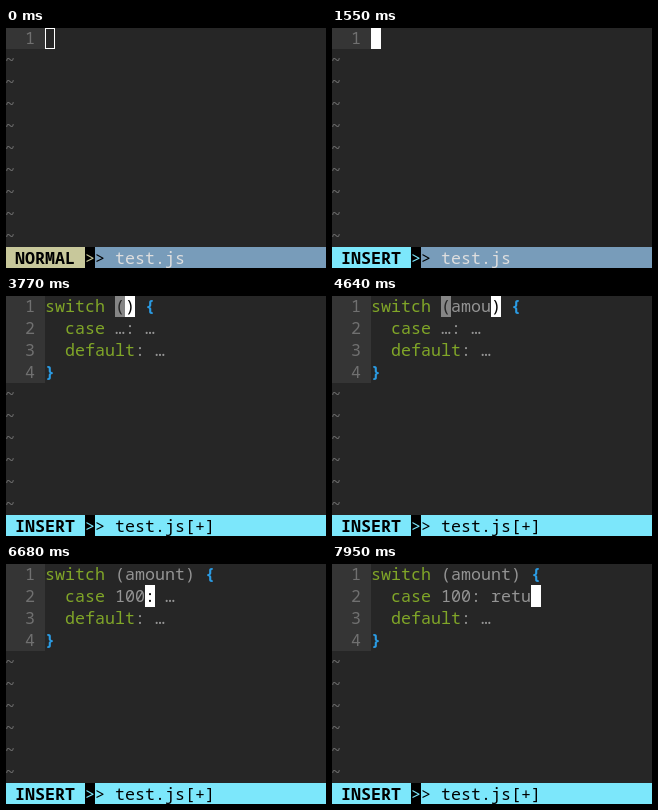
Recreate the animation shown at these times as an HTML page. Size 320 by 240 pixels, loop 8000 ms.

```html
<!DOCTYPE html>
<html lang="en">
<head>
<meta charset="utf-8">
<title>Snippet typing</title>
<style>
  html, body { margin: 0; width: 100%; height: 100%; overflow: hidden; background: #262626; }
  svg { display: block; width: 320px; height: 240px; }
  text { font: 16.667px "Noto Sans Mono", "DejaVu Sans Mono", monospace; white-space: pre; }
  .bold { font-weight: 600; }
</style>
</head>
<body>
<svg id="terminal" viewBox="0 0 320 240"></svg>
<script>
const LOOP = 8000, CELL = 10, LINE = 22, STATUS_ROW = 10;
const color = {
  back: '#262626', gutter: '#353535', number: '#707070', tilde: '#6c6c6c',
  plain: '#949494', keyword: '#80a628', brace: '#2b9ce4', match: '#858585',
  cyan: '#7ce7fb', blue: '#789cba', khaki: '#c8c89b', pale: '#dedede'
};

const FOCUS = 430, INSERT = 1240, EXPAND = 3450, TO_CASE = 5450, TO_BODY = 6950;
const keys = {
  switch: [1730, 1880, 2030, 2190, 2360, 2550],
  amount: [4200, 4350, 4500, 4640, 4780, 4920],
  100: [6030, 6210, 6390],
  retu: [7400, 7550, 7710, 7870]
};

const terminal = document.getElementById('terminal');
const cellX = col => col * CELL - 1;
const cellY = row => row * LINE - 1;
const typed = (word, time) => word.slice(0, keys[word].filter(k => k <= time).length);

const box = (x, y, w, h, fill, extra = '') =>
  `<rect x="${x}" y="${y}" width="${w}" height="${h}" fill="${fill}" ${extra}/>`;
const label = (col, row, text, fill, style = '') =>
  `<text x="${cellX(col)}" y="${cellY(row) + 17}" fill="${fill}" class="${style}">${text}</text>`;
const block = (col, row, fill, char = '', ink = '#000') =>
  box(cellX(col), cellY(row), CELL, LINE, fill) + label(col, row, char, ink);

function buffer(time) {
  if (time < EXPAND) {
    const word = typed('switch', time);
    const cursor = time < FOCUS
      ? box(39.5, 0.5, 9, 20, 'none', 'stroke="#fff"')
      : block(4 + word.length, 0, '#fff');
    return label(4, 0, word, color.keyword) + cursor;
  }
  const subject = typed('amount', time);
  const value = time < TO_CASE ? '…' : typed('100', time);
  const body = time < TO_BODY ? '…' : typed('retu', time);
  const close = 12 + subject.length;
  const colon = 11 + value.length;

  const text = label(4, 0, 'switch', color.keyword)
    + label(11, 0, `(${subject})`, color.plain)
    + label(close + 2, 0, '{', color.brace, 'bold')
    + label(6, 1, 'case', color.keyword)
    + label(11, 1, `${value}: ${body}`, color.plain)
    + label(6, 2, 'default', color.keyword)
    + label(13, 2, ': …', color.plain)
    + label(4, 3, '}', color.brace, 'bold');

  if (time < TO_CASE) {
    return text + block(11, 0, color.match, '(', color.back) + block(close, 0, '#fff', ')');
  }
  if (time < TO_BODY) return text + block(colon, 1, '#fff', ':');
  return text + block(colon + 2 + body.length, 1, '#fff');
}

function statusBar(time) {
  const inserting = time >= INSERT;
  const changed = time >= keys.switch[0];
  const modeColor = inserting ? color.cyan : color.khaki;
  return box(0, 219, 320, 21, changed ? color.cyan : color.blue)
    + box(0, 219, 79, 21, modeColor)
    + label(1, STATUS_ROW, inserting ? 'INSERT' : 'NORMAL', '#000', 'bold')
    + block(8, STATUS_ROW, '#000', '&gt;', modeColor)
    + label(9, STATUS_ROW, '&gt;', '#000')
    + label(11, STATUS_ROW, changed ? 'test.js[+]' : 'test.js', changed ? '#000' : color.pale);
}

function render(time) {
  const lines = time < EXPAND ? 1 : 4;
  let out = box(0, 0, 320, 240, color.back) + box(0, 0, 39, cellY(lines), color.gutter);
  for (let row = 0; row < STATUS_ROW; row++) {
    out += row < lines ? label(2, row, row + 1, color.number) : label(0, row, '~', color.tilde);
  }
  return out + buffer(time) + statusBar(time);
}

let shown = '';
function tick() {
  const next = render(performance.now() % LOOP);
  if (next !== shown) terminal.innerHTML = shown = next;
  requestAnimationFrame(tick);
}
tick();
</script>
</body>
</html>
```
